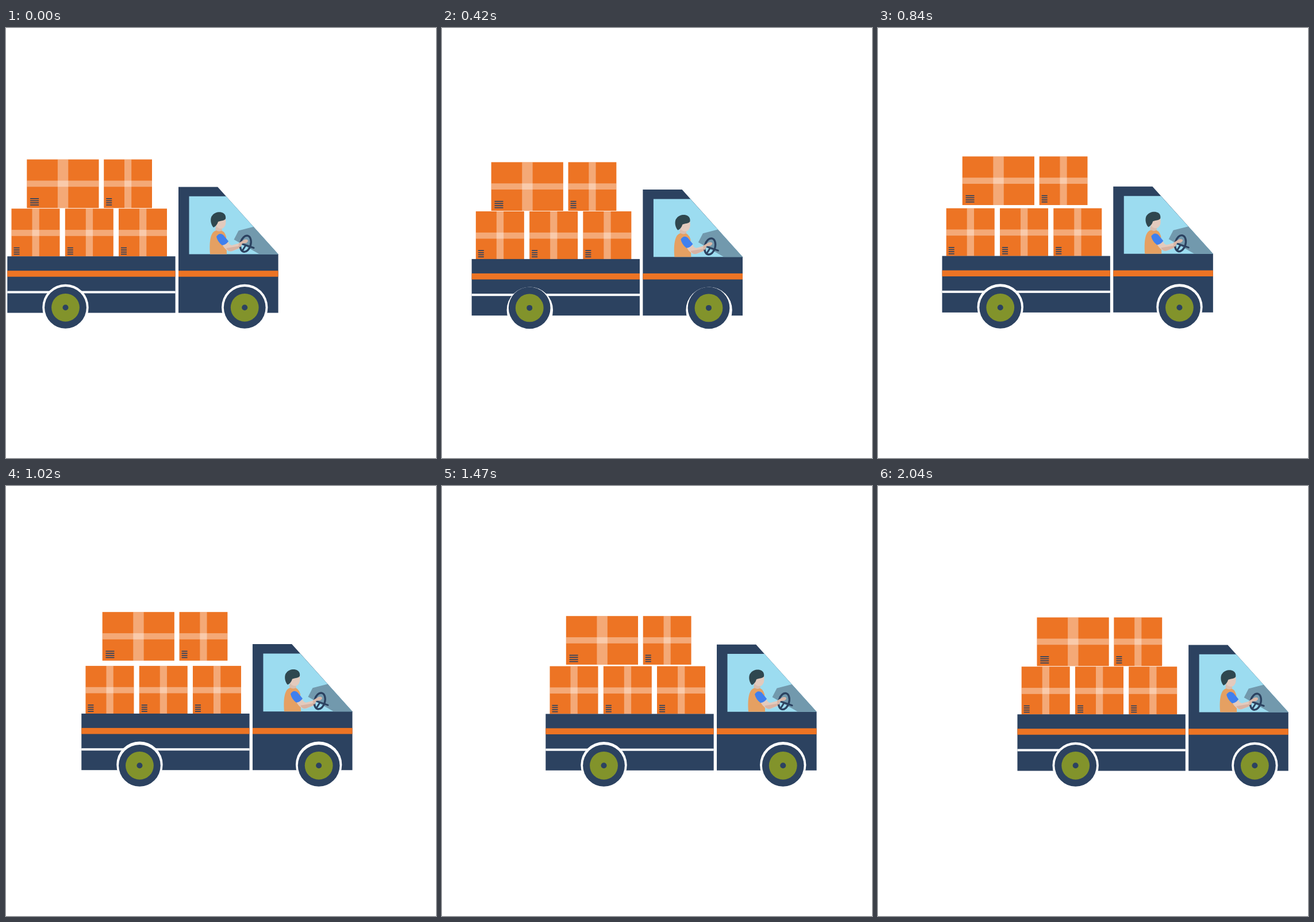
These frames come from a looping animation (748 by 748 pixels, 2070 ms). An HTML page with a canvas:

```html
<!DOCTYPE html>
<html lang="en">
<head>
<meta charset="utf-8">
<title>Delivery truck</title>
<style>
html, body { margin: 0; width: 100%; height: 100%; overflow: hidden; background: #fff; }
canvas { display: block; width: 748px; height: 748px; }
</style>
</head>
<body>
<canvas id="stage" width="748" height="748"></canvas>
<script>
const ctx = document.getElementById('stage').getContext('2d');
const STEP = 30, LOOP = 2070;
const NAVY = '#2c4260', ORANGE = '#ed7424', GREEN = '#82932b', SKIN = '#e3cabd';

// Keys are [step, value] pairs.
const bounce = [[0, 0], [14, 4.7], [22, 0.8], [34, -1.3], [49, -0.75], [68, 0]];
const hop = [[0, 0], [14, 4.8], [22, 0.9], [34, -9.4], [49, -2.4], [68, 0]];
const slide = [[0, 0], [22, 0], [34, 2.4], [49, 1.5], [68, 0]];
const sink = [[0, 0], [14, 0.6], [22, 0], [68, 0]];

// Monotone cubic through the keys
function track(keys, n) {
  const last = keys.length - 1;
  let i = 0;
  while (i < last - 1 && n > keys[i + 1][0]) i++;
  const slope = k => (keys[k + 1][1] - keys[k][1]) / (keys[k + 1][0] - keys[k][0]);
  const tangent = k => {
    if (k === 0) return slope(0);
    if (k === last) return slope(last - 1);
    const a = slope(k - 1), b = slope(k);
    return a * b <= 0 ? 0 : 2 * a * b / (a + b);
  };
  const [x0, y0] = keys[i], [x1, y1] = keys[i + 1];
  const h = x1 - x0, u = (n - x0) / h, v = 1 - u;
  return v * v * (1 + 2 * u) * y0 + u * u * (3 - 2 * u) * y1
    + h * u * v * (v * tangent(i) - u * tangent(i + 1));
}

// Steady drive with one smooth surge
function drive(n) {
  const u = Math.min(1, Math.max(0, (n - 7.8) / 21));
  return 3.272 * n + 17.7 * (1 - Math.cos(Math.PI * u)) / 2;
}

function rect(x0, y0, x1, y1, color) {
  ctx.fillStyle = color;
  ctx.fillRect(x0, y0, x1 - x0, y1 - y0);
}

function disc(x, y, r, color) {
  ctx.fillStyle = color;
  ctx.beginPath();
  ctx.arc(x, y, r, 0, 7);
  ctx.fill();
}

function shape(d, color) {
  ctx.fillStyle = color;
  ctx.fill(new Path2D(d));
}

function line(d, width, color) {
  ctx.lineWidth = width;
  ctx.strokeStyle = color;
  ctx.lineCap = ctx.lineJoin = 'round';
  ctx.stroke(new Path2D(d));
}

function at(x, y, draw) {
  ctx.save();
  ctx.translate(x, y);
  draw();
  ctx.restore();
}

function carton(x, y, w, h, tapeX, tapeW, labelX, labelW) {
  rect(x, y, x + w, y + h, ORANGE);
  const tape = 'rgba(255,255,255,.38)';
  rect(x + tapeX, y, x + tapeX + tapeW, y + h, tape);
  rect(x, y + 36.9, x + w, y + 47.6, tape);
  for (let i = 0; i < 4; i++) {
    const ly = y + 67.4 + i * 3.65;
    rect(x + labelX, ly, x + labelX + labelW, ly + 1.7, NAVY);
  }
}

function topCartons() {
  carton(36.3, 228.6, 125.2, 84.6, 53.6, 18.4, 5.8, 15);
  carton(170.2, 228.6, 83.8, 84.6, 35.8, 12.2, 4, 10);
}

function lowCartons() {
  for (const x of [9.5, 102.8, 196]) carton(x, 314.2, 84, 83.2, 36, 12.3, 4, 10);
}

function driver() {
  shape('M355 393.5 C354 382 354 367 358 359 Q361 352 370 351 Q380 352 383 363 L384 393.5 Z', '#e5a062');
  shape('M365 344 L375 346 L376 352 Q370 356 364 351 Z', '#d9bdae');
  shape('M363 333 C367 326 378 325 382 332 Q384 343 378 348 Q371 351 366 345 Z', SKIN);
  shape('M361 347 C355 341 355 329 359 326 C363 320 373 319 378 322 Q383 325 382 332 C379 336 373 335 369 337 Q367 344 361 347 Z', '#2f474f');
  shape('M376 377 L386 371 Q389 378 393 378 L407 374 L409 382 L394 388 Q384 391 376 377 Z', SKIN);
  shape('M366 363 Q371 355 378 360 L387 371 Q383 377 376 378 Q368 372 366 363 Z', '#3f80ef');
  shape('M383 383 L407 379 L408 382 L393 388 Q387 390 383 383 Z', '#d7b3a3');
}

function steering() {
  ctx.lineWidth = 3.4;
  ctx.strokeStyle = NAVY;
  ctx.beginPath();
  ctx.ellipse(416.8, 375.3, 9, 14.3, 0.26, 0, 7);
  ctx.stroke();
  line('M409 375 L431 382.5 M417 378 L412 386', 3, NAVY);
  shape('M405 374 L415 368 Q421 367 421 371 L418 374 L411 375 L408 381 Q404 382 405 374 Z', '#d9b7a8');
}

function body() {
  rect(2.3, 397.2, 294.6, 495.5, NAVY);
  rect(2.3, 457.5, 294.6, 461.5, '#fff');
  shape('M300 276.4 H368.2 L473.6 393.5 V495.5 H300 Z', NAVY);
  rect(2.3, 422.2, 294.6, 432.7, ORANGE);
  rect(300, 422.2, 473.6, 432.7, ORANGE);
  shape('M318.5 292.8 H382.8 L473.6 393.5 H318.5 Z', '#9cdcf0');
  shape('M396.5 368 L404.5 352.5 L430.5 345.8 L473.6 393.5 H441 Z', '#7299ad');
  driver();
  steering();
  for (const x of [103.5, 415.2]) disc(x, 486, 40.2, '#fff');
}

function wheels() {
  for (const x of [103.5, 415.2]) {
    disc(x, 486.3, 36.4, NAVY);
    disc(x, 486.3, 24.4, GREEN);
    disc(x, 486.3, 5, NAVY);
  }
}

function render(n) {
  rect(0, 0, 748, 748, '#fff');
  const x = drive(n), y = track(bounce, n), drop = track(sink, n);
  at(x + track(slide, n), track(hop, n), topCartons);
  at(x, y, () => { lowCartons(); body(); });
  at(x - drop, drop, wheels);
}

const start = performance.now();
function tick() {
  const ms = Math.max(0, performance.now() - start) % LOOP;
  render(Math.floor(ms / STEP));
  requestAnimationFrame(tick);
}
tick();
</script>
</body>
</html>
```
